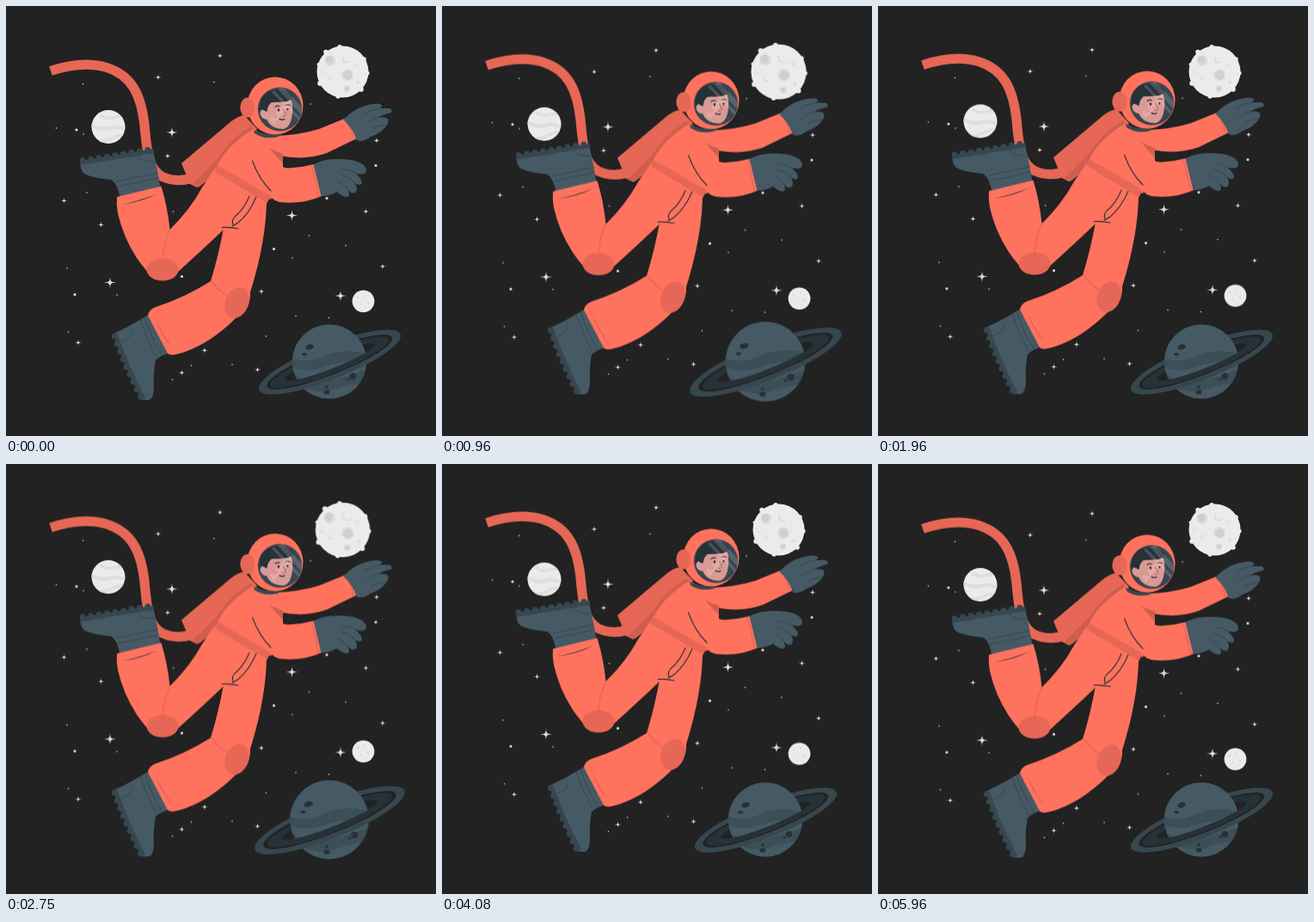
These frames come from a looping animation (500x500 px, 6000 ms). An HTML page:

```html
<!DOCTYPE html>
<html lang="en">
<head>
<meta charset="utf-8">
<title>Floating astronaut</title>
<style>
  html, body { margin: 0; width: 100%; height: 100%; overflow: hidden; background: #222; }
  svg { display: block; width: 100vw; height: 100vh; }

  .suit { fill: #ff725e; }
  .shade { fill: #e66755; }
  .deep { fill: #d05e4e; }
  .slate { fill: #455a64; }
  .slate2 { fill: #37474f; }
  .ink { fill: #263238; }
  .pale { fill: #ebebeb; }
  .pale2 { fill: #dcdcdc; }
  .line { fill: none; stroke: #263238; stroke-width: 1.1; stroke-linecap: round; }
  .seam { fill: none; stroke: #e66755; stroke-width: 1.3; stroke-linecap: round; }
  .fold { fill: none; stroke: #37474f; stroke-width: 1; stroke-linecap: round; }
  .sole { fill: none; stroke: #37474f; stroke-width: 5; }
  .tread { fill: none; stroke: #37474f; stroke-width: 6.5; stroke-linecap: round; stroke-dasharray: 0 9.6; }
  .dots { fill: none; stroke: #dcdcdc; stroke-linecap: round; }
  .stars { fill: #dcdcdc; }

  .drift { animation: float 3s linear infinite; }
  .slow { animation: float 6s linear infinite; }
  .pulse { animation: beat 6s linear infinite; }
  #moon { transform-origin: 391.5px 76px; }
  #ringed { transform-origin: 376.3px 414px; }

  @keyframes float {
    50% { transform: translateY(-10px); }
  }
  @keyframes beat {
    0%, 30%, 40%, 60%, 100% { transform: scale(1); }
    10%, 50% { transform: scale(1.1); }
  }
</style>
</head>
<body>
<svg viewBox="0 0 500 500">
  <defs>
    <path id="big" d="M0-7C.3-1.2 1.2-.3 7 0C1.2.3.3 1.2 0 7C-.3 1.2-1.2.3-7 0C-1.2-.3-.3-1.2 0-7Z"/>
    <use id="small" href="#big" transform="scale(.56)"/>
    <clipPath id="globe"><circle cx="376" cy="413.5" r="43.3"/></clipPath>
    <clipPath id="front"><rect x="-90" y="0" width="180" height="30"/></clipPath>
    <clipPath id="visor"><ellipse cx="318.5" cy="120" rx="25.7" ry="25.5"/></clipPath>
    <clipPath id="banded"><circle cx="119" cy="140.5" r="19.5"/></clipPath>
    <g id="ring" fill-rule="evenodd">
      <path class="slate2" d="M-88.3 0a88.3 20.4 0 0 1 176.6 0a88.3 20.4 0 0 1-176.6 0M-78 0a78 15 0 0 0 156 0a78 15 0 0 0-156 0"/>
      <path fill="#222" d="M-78 0a78 15 0 0 1 156 0a78 15 0 0 1-156 0M-74 0a74 13.3 0 0 0 148 0a74 13.3 0 0 0-148 0"/>
      <path class="ink" d="M-74 0a74 13.3 0 0 1 148 0a74 13.3 0 0 1-148 0M-56 0a56 8 0 0 0 112 0a56 8 0 0 0-112 0"/>
    </g>
  </defs>

  <rect width="500" height="500" fill="#222"/>

  <!-- sky -->
  <g class="drift">
    <g class="stars">
      <use href="#big" x="193" y="147"/><use href="#big" x="121" y="321.5"/>
      <use href="#big" x="332.5" y="243.5"/><use href="#big" x="389" y="337"/>
      <use href="#small" x="249" y="58"/><use href="#small" x="177" y="83"/>
      <use href="#small" x="188" y="174.5"/><use href="#small" x="67.5" y="226.5"/>
      <use href="#small" x="110.5" y="254.5"/><use href="#small" x="84" y="391.5"/>
      <use href="#small" x="431" y="156.5"/><use href="#small" x="418.5" y="239"/>
      <use href="#small" x="438" y="303"/><use href="#small" x="297" y="332"/>
      <use href="#small" x="231" y="400.5"/><use href="#small" x="204.5" y="426.5"/>
      <use href="#small" x="292.5" y="423"/>
    </g>
    <path class="dots" stroke-width="3.2" d="M82 144h0M80 335.5h0M204.5 314.5h0M430 185.5h0M373 223.5h0M311.5 282.5h0M144 427h0"/>
    <path class="dots" stroke-width="1.6" d="M89.5 90.5h0M242 88.5h0M58.5 142h0M90 149h0M94 217h0M71 305h0M129 336h0M72.5 379h0M194.5 239h0M333 293h0M352.5 267h0M395 278.5h0M337 360.5h0M375.5 362.5h0M302.5 384h0M263 417h0M215.5 418h0M193.5 434.5h0M354 114h0"/>
  </g>

  <!-- cratered moon -->
  <g id="moon" class="pulse">
    <circle class="pale" cx="391.5" cy="76.5" r="30"/>
    <g class="pale">
      <circle cx="372" cy="53.5" r="2.8"/><circle cx="388" cy="47.5" r="2.6"/>
      <circle cx="416" cy="62" r="2.8"/><circle cx="420" cy="78" r="2.6"/>
      <circle cx="413" cy="97" r="2.8"/><circle cx="386" cy="105" r="2.6"/>
      <circle cx="365" cy="90" r="2.8"/><circle cx="363.5" cy="68" r="2"/>
    </g>
    <g class="pale2">
      <circle cx="377" cy="63.5" r="6.3"/><circle cx="397" cy="80" r="6.8"/>
      <circle cx="396.5" cy="96" r="3.7"/><circle cx="369" cy="76.5" r="3"/>
      <circle cx="378" cy="83.5" r="3.4"/><circle cx="396" cy="61.5" r="5.3"/>
      <circle cx="408" cy="67" r="2.4"/><circle cx="409" cy="89" r="2"/>
    </g>
    <g class="pale">
      <circle cx="397" cy="60.5" r="4.6"/><circle cx="369.5" cy="76" r="2.3"/>
      <circle cx="378.5" cy="83" r="2.7"/><circle cx="408.5" cy="66.5" r="1.8"/>
    </g>
    <g fill="#cfcfcf">
      <circle cx="376" cy="62.5" r="4.6"/><circle cx="397.5" cy="80.5" r="5"/>
      <circle cx="396.5" cy="96" r="2.4"/>
    </g>
  </g>

  <!-- banded planet -->
  <g class="slow">
    <circle class="pale" cx="119" cy="140.5" r="19.5"/>
    <g clip-path="url(#banded)" fill="#dedede">
      <path d="M98 136Q108 142 119 140Q129 137 140 142V146Q130 141 121 144Q109 147 98 140Z"/>
      <path d="M110 125Q119 131 128 127Q133 125 138 128L137 131Q129 129 123 132Q114 133 108 128Z"/>
      <path d="M106 156Q117 156 125 151Q133 147 139 149L136 152Q128 152 121 157Q115 160 108 158Z"/>
    </g>
  </g>

  <!-- little moon -->
  <g class="slow">
    <circle class="pale" cx="415.5" cy="343.3" r="12.9"/>
    <g class="pale2">
      <circle cx="409" cy="339" r="1.4"/><circle cx="417" cy="337" r="1.3"/>
      <circle cx="421" cy="345" r="1.5"/><circle cx="413" cy="347" r="1.3"/>
      <circle cx="418" cy="351" r="1"/>
    </g>
  </g>

  <!-- ringed planet -->
  <g id="ringed" class="pulse">
    <use href="#ring" transform="translate(376.3 414) rotate(-21.5)"/>
    <circle class="slate" cx="376" cy="413.5" r="43.3"/>
    <g clip-path="url(#globe)">
      <g class="slate2" opacity=".6">
        <path d="M332 410Q352 416 368 408Q394 396 421 405L421 418Q396 410 372 419Q350 427 332 420Z"/>
        <path d="M332 428Q356 441 380 435Q404 428 424 421L418 437Q395 441 378 447Q356 451 340 440Z"/>
      </g>
      <g class="ink">
        <ellipse cx="353" cy="396.5" rx="5" ry="3" transform="rotate(-15 353 396.5)"/>
        <ellipse cx="347" cy="405" rx="3" ry="1.7"/>
        <circle cx="403.5" cy="430.5" r="3.8"/><circle cx="398" cy="434" r="1.6"/>
        <ellipse cx="373" cy="449" rx="3.5" ry="2.6"/><circle cx="373" cy="443" r="1.7"/>
      </g>
    </g>
    <g transform="translate(376.3 414) rotate(-21.5)">
      <use href="#ring" clip-path="url(#front)"/>
    </g>
  </g>

  <!-- astronaut -->
  <g class="drift">
    <path fill="none" stroke="#e66755" stroke-width="11.2" d="M52 75.5C76 67.500 99 66 117 71.500C147 81 157 104 161 138C164 174 167 191 182 198.500C193 203.500 204 203.500 215 200.500"/>

    <!-- backpack -->
    <path class="shade" d="M204 183L262 134Q270 128 277 127L292 143L248 194L222 211L214 207Z"/>
    <path class="deep" d="M285 140Q262 153 244 180L217 207Q220 212 225 210L250 190L290 150Z"/>

    <!-- far arm -->
    <path class="suit" d="M312 151Q342 150 364 143L396 130Q405 138 408 154L373 171Q348 180 318 174L300 160Z"/>
    <path class="seam" d="M393.500 133Q402 141 404 155"/>
    <path class="slate" d="M392.500 132Q404 119 421 115Q433 112 437 115Q438 117 434 119L446 119Q450 121 448 124Q438 126 432 130Q440 128 444 131Q446 135 441 141Q434 149 424 152Q415 159 408 156Q403 142 392.500 132Z"/>
    <path class="fold" d="M434 119Q423 121 416 126M432 130Q422 133 418 138M441 139Q431 139 425 144"/>

    <!-- raised boot -->
    <path class="slate" d="M86.500 182L171 168Q176 189 180 215L133 226Q130 206 122 202Q100 200 91 195Q86 190 86.500 182Z"/>
    <path class="sole" d="M86.500 182.500L172 168.500"/>
    <path class="tread" d="M89 179.500L170 166.500"/>
    <path class="fold" d="M129 204L176 194M131 210L177 200M152 173Q156 182 172 181"/>

    <!-- trailing leg -->
    <path class="suit" d="M129 222L180.500 209.500Q188 234 190.500 260Q214 237 228 211L243 189L305 222L303 230Q296 247 265 257L253 260Q231 281 199 310Q187 319 172 316Q163 309 152 293Q136 268 130 241Q128 231 129 222Z"/>
    <ellipse class="shade" cx="182" cy="306.5" rx="18.5" ry="13"/>
    <path class="seam" d="M182 295Q183 276 190.500 260"/>
    <path class="ink" d="M134 231Q154 227 176 218.500Q157 228 134 231Z"/>

    <!-- lower boot -->
    <path class="slate" d="M127 380Q143 373 164 360L175 358L197 403L188 404Q178 407 174 412Q171 426 172 445Q171 456 167 458L159 458Q142 421 127 380Z"/>
    <path class="sole" d="M126.500 380Q141 421 160 457"/>
    <path class="tread" d="M126 384Q139 421 157 456"/>
    <path class="fold" d="M156 365Q163 387 175 408M161 362Q168 384 181 405M134 390Q146 388 147 376"/>

    <!-- front leg -->
    <path class="suit" d="M253 258L303 224Q303 272 284 333Q285 352 267 363C250 380 225 399 198 405Q191 407 188 404L165 360Q166 353 174 350Q208 339 238 320Q247 291 253 258Z"/>
    <ellipse class="shade" cx="268.5" cy="345" rx="13.5" ry="18.5" transform="rotate(22 268.5 345)"/>
    <path class="seam" d="M239 320Q247 331 257 337"/>
    <path class="ink" d="M172.500 361Q181 382 193 397Q181 383 172.500 361Z"/>
    <path class="line" d="M283 221Q277 236 266 245Q261 251 265 255M291 222Q283 241 270 252Q265 255 263 256M251 257.500Q262 257 270 259"/>

    <!-- torso and near arm -->
    <path class="suit" d="M288 143Q300 152 318 151L322 174L322 188L308 225L244 189Q256 162 288 143Z"/>
    <path class="deep" d="M306 165Q315 170 322 172L322 183Q315 176 306 165Z"/>
    <path class="shade" d="M246.500 185.500L308 221L303.500 229L242.500 192.500Z"/>
    <path class="suit" d="M287 178Q300 164 309 168Q314 188 328 188.500Q343 188 358 184L367 221Q345 231 318 228Q307 226 303 212Z"/>
    <path class="line" d="M286.500 180Q294 201 308 215"/>
    <path class="seam" d="M355.500 186.500L363.500 221.500"/>
    <path class="slate" d="M357.500 184Q371 177 386 178Q404 177 415 184Q421 190 418 194Q414 197 406 194Q414 201 414 206Q412 210 406 206Q410 214 406 217Q402 219 397 213Q401 220 397 222Q391 222 385 216Q377 221 366.500 221Z"/>
    <path class="fold" d="M406 194Q399 190 391 190M406 206Q399 198 390 197M397 213Q392 206 386 204"/>

    <!-- head -->
    <path class="slate2" d="M288 144Q300 151 317 149L317 152Q300 156 289 148Z"/>
    <ellipse class="suit" cx="313" cy="116" rx="32.5" ry="33.5"/>
    <ellipse class="shade" cx="281" cy="118" rx="8.7" ry="11.5"/>
    <path class="suit" d="M284 104Q291 112 288 131L296 138L298 100Z"/>
    <g clip-path="url(#visor)">
      <rect class="slate2" x="290" y="92" width="58" height="56"/>
      <path class="ink" d="M295 122Q293 106 306 99Q322 93 333 104L333 112L304 130Z"/>
      <path fill="#d99a96" d="M303 112Q319 113 331 107Q334 115 333 124Q332 140 323 143Q307 143 303 131Z"/>
      <path fill="#d99a96" d="M303 122Q296 118 295.500 125Q297 132 304 132Z"/>
      <path class="ink" d="M299 121Q299 106 313 100Q328 98 333 109Q323 113 310 111Q304 115 303.500 123Z"/>
      <path fill="#edb9b3" d="M307 131L326 112L331 109L331 115L311 138Z" opacity=".55"/>
      <g class="ink">
        <ellipse cx="317" cy="121" rx="1.2" ry="1.7"/>
        <ellipse cx="327.5" cy="120" rx="1.1" ry="1.600"/>
      </g>
      <path class="line" d="M313 117.500Q315 115.500 318 116.500M325 115.500Q327.500 114 330 115.500M318 131Q321 133.500 324 131.500"/>
      <path d="M322.500 120Q326 126 325 127.500Q324 129 321.500 128.500" fill="none" stroke="#a9615e"/>
      <circle cx="313" cy="128" r="2.6" fill="#e66755" opacity=".35"/>
      <g fill="#fff" opacity=".16">
        <path d="M322 94L347 121L345 128L316 97Z"/>
        <path d="M312 98L344 132L342 135L309 100Z"/>
      </g>
    </g>
  </g>
</svg>
</body>
</html>
```
